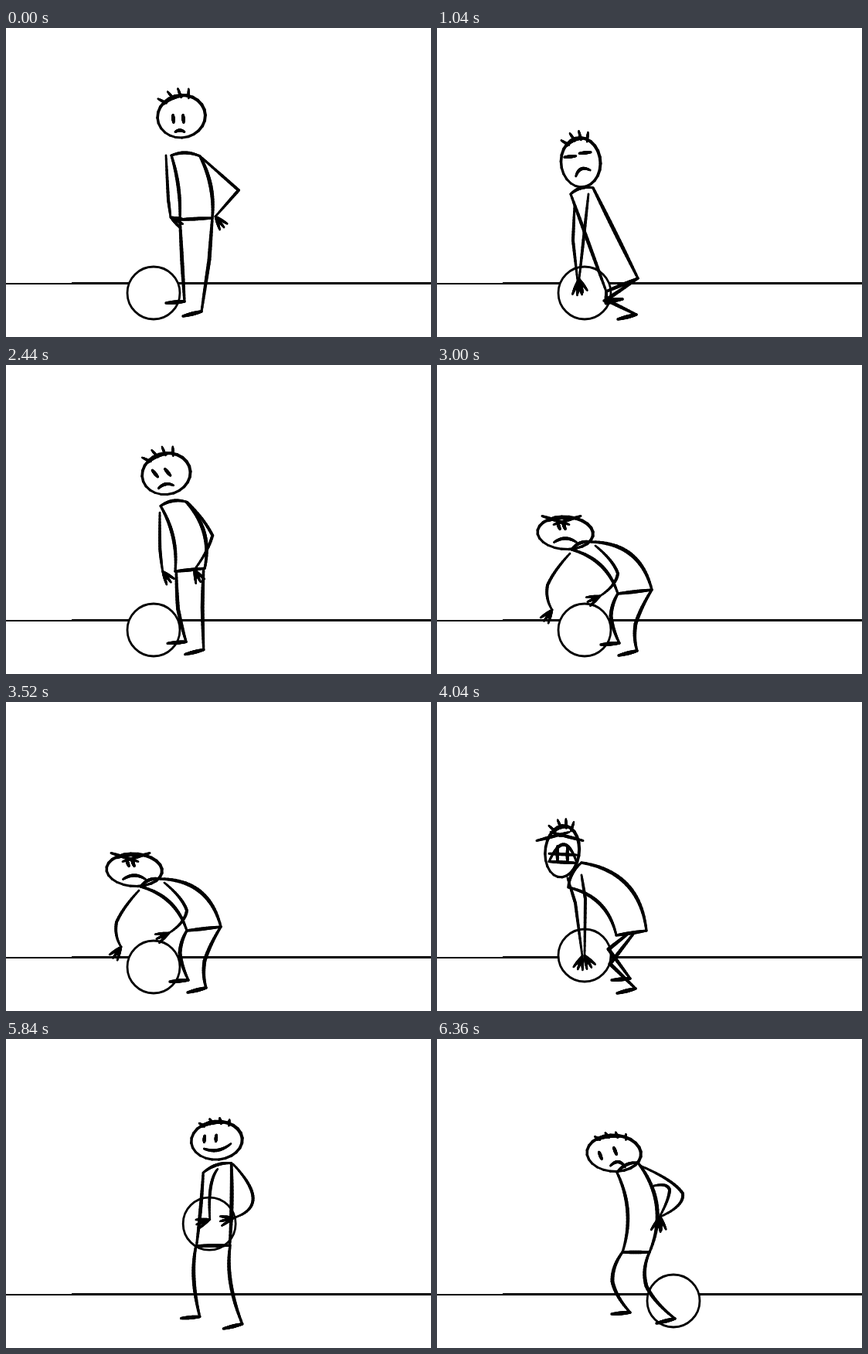
Write an HTML page with a canvas that moves like this. It is 550 by 400 pixels and loops after 7.24 s.

```html
<!DOCTYPE html>
<html lang="en">
<head>
<meta charset="utf-8">
<title>Heavy ball</title>
<style>
html, body { margin: 0; width: 100%; height: 100%; overflow: hidden; background: #fff; }
canvas { display: block; }
</style>
</head>
<body>
<canvas id="stage" width="550" height="400"></canvas>
<script>
const ctx = document.getElementById('stage').getContext('2d');
const LOOP = 7240, STEP = 40, GROUND = 380, SEGMENTS = 24;
const { sin, cos, PI } = Math;

// Joints of the figure. Pairs run front to back; arms are shoulder, elbow, hand.
// eyes: x, y, gap, tilt, length, angle; mouth: x, y, half width, arch, tilt;
// brow: x, y, half width, drop (all from the head centre).
const rig = joints => ({ ball: [191, 343], brow: [0, -15, 0, 0], lean: [0, 1],
  bend: 0, soft: 0, inset: 0, hair: 9, grit: 0, ...joints });

const stand = rig({
  head: [227, 114.5, 31, 27.5, -.15],
  eyes: [-4, 3, 13, 0, 10, 1.5], mouth: [-2, 20, 6, 2, 0],
  neck: [214, 165, 251, 166], hips: [225, 248, 267, 246], bend: 6,
  arm1: [207, 165, 210, 222, 213, 245], arm2: [250, 165, 301, 210, 271, 244], fingers: [.5, .9],
  knees: [228, 305, 263, 300], feet: [231, 354, 253, 367]
});
const heave = rig({
  head: [186, 174, 25.5, 32, -.08],
  eyes: [-4, -10, 20, -.25, 15, -.1], mouth: [3, 14, 10, 6, -.4],
  neck: [173, 215, 202, 207], hips: [219, 341, 260, 324],
  arm1: [178, 230, 176, 275, 182, 328], arm2: [196, 215, 190, 270, 184, 325], fingers: [1.6, 1.3],
  knees: [219, 356, 219, 352], feet: [240, 351, 258, 371]
});
const tired = rig({
  head: [169, 179, 32, 26, -.25],
  eyes: [-10, -8, 22, -.28, 14, -.15], mouth: [3, 12, 16, 6, -.52],
  neck: [172, 207, 198, 191], hips: [206, 296, 238, 289], bend: 21, soft: 1, inset: .1,
  arm1: [181, 230, 178, 262, 183, 301], arm2: [204, 193, 208, 235, 196, 297], fingers: [1.6, 1.4],
  knees: [212, 332, 238, 335], feet: [236, 365, 260, 371]
});
const angry = rig({
  head: [166, 217.5, 36, 21, .05],
  eyes: [-5, -9, 7, 0, 9, 1.2], mouth: [0, 12, 14.5, 5, 0], brow: [-5, -22, 25, 11],
  neck: [174, 239, 200, 229], hips: [234, 296, 278, 291], bend: 19, soft: .7, hair: 0,
  arm1: [172, 244, 143, 285, 149, 317], arm2: [205, 234, 234, 270, 211, 299], fingers: [2.2, 2.7],
  knees: [225, 325, 257, 335], feet: [236, 360, 259, 370]
});
const strain = rig({
  ball: [191, 328], head: [162, 193.5, 22, 33.5, .1],
  eyes: [-2, -21, 0, 0, 4, 0], mouth: [1, 14, 18, 23, .05], brow: [-3, -14, 30, -11],
  neck: [170, 240, 187, 208], hips: [232, 302, 271, 296], bend: 23, inset: .4, grit: 1,
  arm1: [169, 228, 179, 260, 188, 329], arm2: [187, 224, 192, 255, 191, 328], fingers: [1.9, 1.05],
  knees: [222, 320, 224, 339], feet: [250, 358, 257, 371]
});
const proud = rig({
  ball: [248, 215], head: [256.5, 129.5, 32, 25.5, .02],
  eyes: [-8.5, -4, 13, 0, 8, 1.6], mouth: [.5, 5, 19.5, -7, -.26],
  neck: [238, 176, 275, 163], hips: [237, 267, 282, 266], bend: -2, soft: 1, hair: 5,
  arm1: [247, 165, 233, 195, 240, 238], arm2: [277, 164, 298, 210, 278, 236], fingers: [3, 3.2],
  knees: [240, 310, 287, 315], feet: [249, 361, 302, 371]
});
const sore = rig({
  ball: [306, 339], head: [229, 148, 35, 23.5, .05],
  eyes: [-8, 0, 20, -.3, 10, 1.2], mouth: [5, 17, 9.5, 6, .1],
  neck: [233, 173, 260, 160], hips: [240, 276, 275, 276], bend: 17, soft: .8, hair: 4,
  arm1: [281, 190, 301, 195, 287, 232], arm2: [263, 164, 318, 200, 289, 230], fingers: [1.8, 1.5],
  knees: [227, 314, 271, 320], feet: [250, 354, 308, 362]
});

const lerp = (a, b, k) => a + (b - a) * k;
const mix = (a, b, k) => Array.isArray(a) ? a.map((v, i) => lerp(v, b[i], k)) : lerp(a, b, k);
const blend = (a, b, k) =>
  Object.fromEntries(Object.keys(a).map(part => [part, mix(a[part], b[part], k)]));
const lean = (pose, dx, stretch = 1) => ({ ...pose, lean: [dx, stretch] });

const stoop = blend(stand, tired, .4), slump = lean(tired, -24, .96);
const rest = blend(tired, stand, .55), squat = lean(blend(stand, angry, .55), 14);
const grip = blend(angry, strain, .4), lifted = blend(strain, proud, .88);
const smug = lean(blend(strain, proud, 1.1), 4);

// Time, pose, and how far the body rocks until the next key.
const keys = [
  [0, stand], [520, stand], [720, stoop], [880, stoop],
  [1040, heave, 26], [1440, heave], [1560, slump], [1880, slump],
  [1920, tired], [1960, tired], [2240, rest], [2400, rest],
  [2560, lean(stand, 14, .95)], [2680, squat], [2880, squat],
  [3000, angry, 24], [3520, angry], [3640, grip], [3680, grip, 20],
  [4040, strain, 16], [4240, strain], [4360, lifted], [4400, lifted],
  [4640, blend(strain, proud, 1.1)], [4840, proud], [5040, proud], [5240, smug], [5720, smug],
  [5920, lean(blend(proud, sore, .35), 24)], [6120, lean(blend(proud, sore, .95), -26)],
  [6360, sore], [LOOP, sore]
];

function poseAt(t) {
  const next = keys.findIndex(key => key[0] > t);
  const [t0, from, rock = 0] = keys[next - 1], [t1, to] = keys[next];
  const k = (t - t0) / (t1 - t0);
  const pose = blend(from, to, k * k * (3 - 2 * k));
  pose.lean[0] -= rock * sin(2 * PI * k) ** 2;
  return pose;
}

// Brush stroke along path(u), thickest in the middle.
function ink(path, width) {
  let last = path(0);
  for (let i = 1; i <= SEGMENTS; i++) {
    const point = path(i / SEGMENTS);
    ctx.lineWidth = width * (.7 + .35 * sin(PI * i / SEGMENTS));
    ctx.beginPath();
    ctx.moveTo(...last);
    ctx.lineTo(...point);
    ctx.stroke();
    last = point;
  }
}

const line = (a, b, width) => ink(u => mix(a, b, u), width);
const ray = ([x, y], angle, length) => [x + length * cos(angle), y + length * sin(angle)];

// Through a joint: sharp at soft 0, round at soft 1.
function limb(a, joint, b, soft, width) {
  const control = joint.map((v, i) => 2 * v - (a[i] + b[i]) / 2);
  ink(u => {
    const sharp = u < .5 ? mix(a, joint, 2 * u) : mix(joint, b, 2 * u - 1);
    const round = mix(mix(a, control, u), mix(control, b, u), u);
    return mix(sharp, round, soft);
  }, width);
}

function bow(a, b, height, width) {
  const dx = b[0] - a[0], dy = b[1] - a[1], k = height / (Math.hypot(dx, dy) || 1);
  limb(a, [(a[0] + b[0]) / 2 + dy * k, (a[1] + b[1]) / 2 - dx * k], b, 1, width);
}

function drawHead({ head: [cx, cy, rx, ry, turn], eyes, mouth, brow, hair, grit }) {
  const rim = (angle, grow = 0) => {
    const x = (rx + grow) * cos(angle), y = (ry + grow) * sin(angle);
    return [cx + x * cos(turn) - y * sin(turn), cy + x * sin(turn) + y * cos(turn)];
  };
  ink(u => rim(2.2 + 2 * PI * u), 4);
  ink(u => rim(lerp(-2.3, -1.4, u), -1), 5);
  if (hair > 1) for (const a of [-2.2, -1.8, -1.45, -1.1]) line(rim(a, -3), rim(a - .1, hair), 3.2);

  const [ex, ey, gap, tilt, length, angle] = eyes;
  for (const side of [-.5, .5]) {
    const eye = ray([cx + ex, cy + ey], tilt, side * gap);
    line(ray(eye, angle, -length / 2), ray(eye, angle, length / 2), 4.2);
  }
  const [bx, by, reach, drop] = brow;
  if (reach > 1) for (const side of [-1, 1])
    line([cx + bx + side * reach, cy + by], [cx + bx - side * reach * .4, cy + by + drop], 4);

  const [mx, my, half, arch, slope] = mouth, lips = [cx + mx, cy + my];
  bow(ray(lips, slope, -half), ray(lips, slope, half), arch, 4);
  if (grit > .5) for (const k of [0, .45]) {
    const row = [lips[0], lips[1] - arch * k], column = ray(lips, slope, half * (k * 1.6 - .4));
    line(ray(row, slope, -half), ray(row, slope, half), 4);
    line(column, [column[0], column[1] - arch * .9], 4);
  }
}

function drawBody({ neck, hips, bend, soft, inset, arm1, arm2, fingers, knees, feet }) {
  const pair = v => [v.slice(0, 2), v.slice(2, 4)];
  const [chest, nape] = pair(neck), [hip1, hip2] = pair(hips);
  bow(chest, nape, 4, 4);
  bow(chest, hip1, bend * .6, 4.4);
  bow(nape, hip2, bend, 4.8);
  line(hip1, hip2, 4.4);
  [arm1, arm2].forEach((arm, i) => {
    const hand = arm.slice(4);
    limb(...pair(arm), hand, soft, 3.8);
    for (const spread of [-.35, 0, .35]) line(hand, ray(hand, fingers[i] + spread, 18), 3.6);
  });
  pair(knees).forEach((knee, i) => {
    const foot = pair(feet)[i];
    limb(mix(hip1, hip2, i ? 1 - inset : inset), knee, foot, soft, 4.6);
    line(foot, [foot[0] - 24, foot[1] + 2 + 4 * i], 4.8);
  });
}

function draw(pose) {
  ctx.fillStyle = '#fff';
  ctx.fillRect(0, 0, 550, 400);
  ctx.fillStyle = '#000';
  ctx.fillRect(0, 330, 85, 2);
  ctx.fillRect(85, 329, 465, 3);

  ctx.fillStyle = '#fff';
  ctx.strokeStyle = '#000';
  ctx.lineCap = 'round';
  ctx.lineWidth = 2.8;
  ctx.beginPath();
  ctx.arc(...pose.ball, 34, 0, 2 * PI);
  ctx.fill();
  ctx.stroke();

  // Sway and stretch over planted feet.
  const [dx, stretch] = pose.lean, shear = dx / 220;
  ctx.save();
  ctx.transform(1, 0, -shear, stretch, shear * GROUND, GROUND * (1 - stretch));
  drawBody(pose);
  drawHead(pose);
  ctx.restore();
}

const start = performance.now();
function tick() {
  const t = (performance.now() - start) % LOOP;
  draw(poseAt(Math.floor(t / STEP) * STEP));
  requestAnimationFrame(tick);
}
tick();
</script>
</body>
</html>
```
